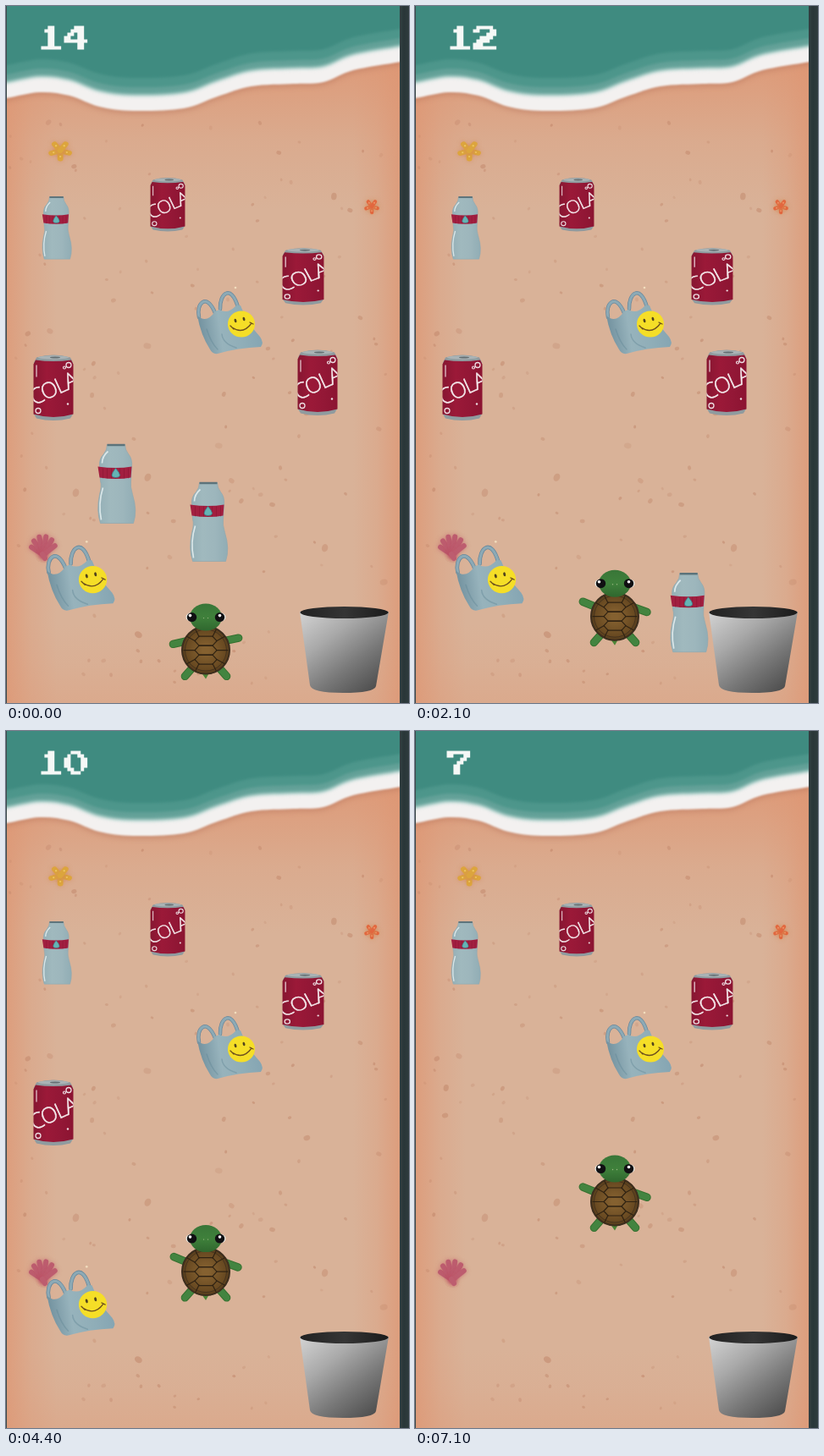
An HTML page with a canvas for the animation above (7.2 s loop, 476 px wide and 824 px high).

```html
<!DOCTYPE html>
<html lang="en">
<head>
<meta charset="utf-8">
<title>Beach clean-up</title>
<style>
html, body { margin: 0; width: 100%; height: 100%; overflow: hidden; background: #2b393b; }
canvas { display: block; }
</style>
</head>
<body>
<canvas id="stage" width="476" height="824"></canvas>
<script>
const W = 476, H = 824, LOOP = 7200, TAU = Math.PI * 2;
const stage = document.getElementById('stage').getContext('2d');
const backdrop = document.createElement('canvas');
backdrop.width = W;
backdrop.height = H;
let g = backdrop.getContext('2d');

const clamp = v => Math.min(1, Math.max(0, v));
const mix = (a, b, p) => a + (b - a) * p;
const easeOut = (p, power) => 1 - (1 - p) ** power;

function oval(x, y, rx, ry, fill, angle = 0) {
  g.beginPath();
  g.ellipse(x, y, rx, ry, angle, 0, TAU);
  if (fill) { g.fillStyle = fill; g.fill(); }
}

function ring(x, y, r, color, width) {
  oval(x, y, r, r);
  g.strokeStyle = color;
  g.lineWidth = width;
  g.stroke();
}

function shape(path, fill, stroke, width = 1) {
  const p = new Path2D(path);
  if (fill) { g.fillStyle = fill; g.fill(p, 'evenodd'); }
  if (stroke) { g.strokeStyle = stroke; g.lineWidth = width; g.stroke(p); }
}

const line = (x0, y0, x1, y1, color, width) => shape(`M${x0} ${y0}L${x1} ${y1}`, null, color, width);

function gradient(x0, y0, x1, y1, ...colors) {
  const grad = g.createLinearGradient(x0, y0, x1, y1);
  colors.forEach((c, i) => grad.addColorStop(i / (colors.length - 1), c));
  return grad;
}

function at(x, y, sx, sy, draw) {
  g.save();
  g.translate(x, y);
  g.scale(sx, sy);
  draw();
  g.restore();
}

function sand() {
  g.fillStyle = '#d9b298';
  g.fillRect(0, 0, W, H);
  const fade = (x0, y0, x1, y1, alpha) => {
    const tint = a => `rgba(222,150,115,${a * alpha})`;
    g.fillStyle = gradient(x0, y0, x1, y1, tint(1), tint(.35), tint(0));
    g.fillRect(0, 0, W, H);
  };
  fade(0, 0, 60, 0, .75);
  fade(466, 0, 410, 0, .75);
  fade(0, 80, 0, 240, .75);
  fade(0, H, 0, 730, .3);

  let seed = 29;
  const random = () => (seed = seed * 16807 % 2147483647) / 2147483647;
  for (let i = 0; i < 130; i++) {
    const r = 1.4 + random() ** 3 * 2.4;
    oval(random() * 460, 115 + random() * 705, r * 1.3, r, `rgba(190,130,102,${.2 + random() * .3})`, random() * 3);
  }
}

const shore = [[-35, 105], [0, 100], [40, 93], [75, 97], [110, 110], [150, 115], [210, 112], [250, 98],
  [290, 86], [340, 83], [375, 81], [410, 67], [466, 57], [500, 50]];

// Fills from above the stage down to the shoreline shifted by dy.
function water(dy, fill, blur) {
  g.filter = `blur(${blur}px)`;
  g.beginPath();
  g.moveTo(-35, -20);
  g.lineTo(-35, shore[0][1] + dy);
  for (let i = 0; i < shore.length - 1; i++) {
    const [before, a, b, after] = [-1, 0, 1, 2].map(k => shore[Math.min(shore.length - 1, Math.max(0, i + k))]);
    g.bezierCurveTo(a[0] + (b[0] - before[0]) / 6, a[1] + (b[1] - before[1]) / 6 + dy,
      b[0] - (after[0] - a[0]) / 6, b[1] - (after[1] - a[1]) / 6 + dy, b[0], b[1] + dy);
  }
  g.lineTo(500, -20);
  g.fillStyle = fill;
  g.fill();
  g.filter = 'none';
}

function sea() {
  water(12, 'rgba(180,112,88,.45)', 3);
  water(9, '#f3f1f0', 1.2);
  water(-8, '#dcebe8', 2);
  water(-10, '#63a198', 2);
  water(-19, '#4d968b', 1.5);
  water(-30, '#3f8b80', 1.5);
}

function star(x, y, r, color, dots) {
  g.lineCap = 'round';
  for (let i = 0; i < 5; i++) {
    const a = i * TAU / 5 + .3, dx = Math.cos(a) * r, dy = Math.sin(a) * r;
    line(x, y, x + dx, y + dy, color, r * .62);
    oval(x + dx * .75, y + dy * .75, 1, 1, dots);
  }
}

function decorations() {
  g.shadowBlur = 5;
  g.shadowColor = 'rgba(215,140,85,.7)';
  at(64, 171, 1.15, 1, () => star(0, 0, 9.5, '#dca53c', '#f0cc60'));
  star(432, 237, 7, '#e2663e', '#f39468');
  g.shadowColor = 'rgba(190,80,100,.6)';
  for (let i = 0; i < 6; i++) {
    const a = i * .57 - 3.05;
    line(44, 649, 44 + Math.cos(a) * 14, 641 + Math.sin(a) * 14, '#bd5d6f', 6);
  }
  line(43, 648, 46, 653, '#bd5d6f', 6);
  g.shadowBlur = 0;
}

function paintBackdrop() {
  sand();
  sea();
  decorations();
  g.fillStyle = gradient(464, 0, 476, 0, '#354244', '#293638', '#2f3c3e');
  g.fillRect(465, 0, 11, H);
  g.fillStyle = '#3b4a4b';
  g.fillRect(0, 0, 1, H);
}

// Trash is drawn around its own centre.
function can() {
  shape('M-20-36Q0-42 20-36L23-30V31L20 36Q0 41-20 36L-23 31V-30Z', '#8f9b9f');
  g.save();
  const body = new Path2D('M-21-33Q0-30 21-33L23.5-28V31Q0 38-23.5 31V-28Z');
  g.fillStyle = gradient(-24, 0, 24, 0, '#861631', '#9b1938', '#931736', '#8b1431');
  g.fill(body);
  g.clip(body);
  g.save();
  g.translate(-23, 21);
  g.rotate(-.43);
  g.fillStyle = g.strokeStyle = '#f6edef';
  g.lineWidth = .5;
  g.font = '300 26px "Open Sans", sans-serif';
  g.letterSpacing = '-1.5px';
  g.fillText('COLA', 0, 0);
  g.strokeText('COLA', 0, 0);
  g.restore();
  for (const s of [-1, 1]) {
    ring(s * 18, s * -27, 3, '#eddce1', 1.3);
    ring(s * 13, s * -30 + 6, 1.5, '#eddce1', 1.2);
  }
  oval(17, 19, 1.2, 1.2, '#eddce1');
  line(-20, -27, -20, -13, '#e4c3cb', 1.3);
  g.restore();
  oval(0, -36, 18, 2.2, '#aab3b5');
  oval(2, -36, 6, 1.1, '#646f73');
}

function bottle() {
  shape('M-11-46H10Q10-40 14-35Q19-29 18-20L17-3Q16 3 19 13Q25 32 20 47H-19Q-24 32-20 13Q-17 3-19-3L-20-20Q-21-29-15-35Q-11-40-11-46Z',
    gradient(-22, 0, 22, 0, '#94afb6', '#a0b9be', '#9db6bc', '#91adb5'), '#8da8b0', .7);
  line(-11, -45.5, 10, -45.5, '#5c737a', 2.5);
  shape('M-22-20Q0-17 18-20L17-7Q0-4-20-7Z', '#a21f40');
  for (let x = -16; x < 16; x += 5) line(x, -18, x, -6, 'rgba(120,15,45,.35)', 1);
  shape('M-1-18Q9-7-1-7Q-10-7-1-18Z', '#65b4b5', '#397d88', .8);
  shape('M-10-38Q-17-32-17-24M-16 5Q-22 24-18 43', null, '#dae7e9', 1.7);
}

function bag() {
  g.lineCap = 'round';
  for (const [color, width] of [['#68879b', 4.5], ['#8caab6', 3]])
    shape('M-36-6C-40-22-27-36-17-11M-11-16C-12-34 2-46 10-18', null, color, width);
  shape('M-38-8Q-27 2-17-13L-12-15Q-2-9 8-20L13-20Q20 0 36 17Q41 24 37 29Q10 30-14 37Q-20 38-23 32Q-34 15-38-8Z',
    gradient(-34, 10, 34, 0, '#7594a1', '#97b3bc', '#90aeb8', '#86a6b3'));
  shape('M-27 8Q-22 24-14 32M-9 14Q-8 25 8 30', null, 'rgba(96,132,148,.4)', 1.5);
  oval(14, 2, 16, 15.5, '#f5de27');
  for (const s of [-1, 1]) oval(12 + s * 5, -3 - s, 1.4, 2.4, '#51431c', -.25);
  shape('M3 6Q16 15 26 1M1 4L5 8M24 0L28 2', null, '#6d501e', 1.3);
  oval(7, -41, 1.3, 1.3, '#f1dcbd');
}

const binMouth = { x: 400, y: 740 };
const trash = [
  { draw: can, x: 191, y: 235, sx: .87, sy: .82 },
  { draw: can, x: 351, y: 320, sx: 1.04, sy: .87 },
  { draw: bottle, x: 60, y: 262, sx: .78, sy: .79 },
  { draw: bag, x: 264, y: 374 },
  { draw: bottle, x: 239.5, y: 609.5, from: 400, to: 1300 },
  { draw: bottle, x: 130.5, y: 564.5, from: 1750, to: 2500 },
  { draw: can, x: 368, y: 445.5, from: 3150, to: 3850 },
  { draw: bag, x: 88, y: 676, sx: 1.04, sy: 1.04, from: 4700, to: 6100 },
  { draw: can, x: 56, y: 451.5, from: 6330, to: 6700, sag: 170 }
];

// A dragged item slows down along a sagging path, then drops out of sight.
function drawTrash({ draw, x, y, sx = 1, sy = 1, from = LOOP, to = LOOP + 1, sag = 34 }, t) {
  if (t >= to) return;
  const p = easeOut(clamp((t - from) / (to - from)), 2);
  at(mix(x, binMouth.x, p), mix(y, binMouth.y, p) + sag * Math.sin(p * Math.PI), sx, sy, draw);
}

function bin() {
  shape('M347 716L359 803Q361 812 398 812Q435 812 437 804L452 716Z',
    gradient(355, 715, 430, 815, '#d0d0d0', '#a9a9a9', '#787878', '#4c4c4c'));
  oval(399.5, 717, 52, 7, gradient(348, 0, 452, 0, '#222', '#353535', '#1b1b1b'));
}

// The turtle takes one stride up the beach for each binned item.
const STRIDE = 400, STEP = 41.3;
const strideStarts = [-.65 * STRIDE, ...trash.filter(item => item.to).map(item => item.to)];

function turtlePose(t) {
  let y = 763 + STEP, swing = 1;
  for (const start of strideStarts) {
    const p = clamp((t - start) / STRIDE);
    y -= STEP * easeOut(p, 3);
    if (p > 0 && p < 1) swing = Math.cos(p * TAU);
  }
  return { y: y - 2 * (1 - swing), swing };
}

function limb(x, y, angle, length) {
  const endX = x + Math.cos(angle) * length, endY = y + Math.sin(angle) * length;
  line(x, y, endX, endY, '#35702f', 9.5);
  line(x, y, endX, endY, '#438440', 7.5);
}

function turtle(t) {
  const { y, swing } = turtlePose(t);
  g.save();
  g.translate(236, y);
  g.lineCap = g.lineJoin = 'round';
  for (const s of [-1, 1]) {
    const forward = s > 0 ? 0 : Math.PI;
    limb(s * 22, -11, forward + (.37 - s * .02) * swing, 17);
    limb(s * 16, 21, forward + s * .85, 13);
  }
  shape('M-5 27L0 34L4 27Z', '#4c8537');
  const shell = g.createRadialGradient(0, 0, 4, 0, 0, 30);
  shell.addColorStop(0, '#856130');
  shell.addColorStop(.75, '#684921');
  shell.addColorStop(1, '#493318');
  oval(0, 0, 28.5, 28.5, shell);
  ring(0, 0, 28, '#3d2e1e', 2);
  ring(0, 0, 24.5, '#3d2e1e', .8);
  for (const cy of [-11, 0, 11])
    shape(`M-13 ${cy}L-8 ${cy - 5.5}H8L13 ${cy}L8 ${cy + 5.5}H-8Z`, null, '#302313', 1.2);
  for (const sx of [-1, 1]) {
    line(sx * 13, 0, sx * 26, 0, '#302313', 1.2);
    for (const sy of [-1, 1])
      shape(`M${sx * 13} ${sy * 11}L${sx * 22} ${sy * 16}M${sx * 8} ${sy * 16}L${sx * 12} ${sy * 24}`, null, '#302313', 1.2);
  }
  oval(0, -39, 19, 16, gradient(0, -55, 0, -23, '#397638', '#3f803b', '#2f672e'));
  for (const s of [-1, 1]) {
    oval(s * 18, -39, 5.5, 5, '#e8eae4');
    oval(s * 16.5, -39, 5.7, 5.5, '#100f12');
    oval(s * 17.5 - 1, -41, 1.8, 1.8, '#fff');
    oval(s * 2.5, -38, .7, .7, '#9cb982');
  }
  g.restore();
}

// Blocky digit outlines on a grid of seven rows.
const digits = {
  0: 'M2 0H5V1H6V2H7V5H6V6H5V7H2V6H1V5H0V2H1V1H2ZM2 1H4V2H5V6H3V5H2Z',
  1: 'M3 0H5V6H7V7H1V6H3V2H2V1H3Z',
  2: 'M1 0H6V1H7V3H6V4H5V5H3V6H7V7H0V5H1V4H2V3H4V2H5V1H2V2H0V1H1Z',
  3: 'M1 0H7V1H6V2H5V3H6V4H7V6H6V7H1V6H0V5H2V6H5V4H2V3H3V2H4V1H1Z',
  4: 'M3 0H6V4H7V5H6V7H4V5H0V3H1V2H2V1H3ZM4 2V4H2V3H3V2Z',
  7: 'M0 0H7V2H6V3H5V4H4V7H2V4H3V3H4V2H5V1H2V2H0Z',
  8: 'M1 0H5V1H6V3H5V4H7V6H6V7H1V6H0V4H1V3H0V1H1ZM2 1H5V3H3V2H2ZM1 4H3V5H5V6H1Z',
  9: 'M1 0H6V1H7V5H6V6H5V7H1V6H4V5H5V4H1V3H0V1H1ZM2 1H5V3H2Z'
};

function score(value) {
  [...String(value)].forEach((digit, place) =>
    at(37.5 + place * 31, 23.5, 3.95, 4, () => shape(digits[digit], '#f5f8f6')));
}

function render(t) {
  g.drawImage(backdrop, 0, 0);
  bin();
  turtle(t);
  trash.forEach(item => drawTrash(item, t));
  score(14 - Math.floor((t + 300) / 1000));
}

paintBackdrop();
g = stage;
const start = performance.now();
function tick() {
  render((performance.now() - start) % LOOP);
  requestAnimationFrame(tick);
}
tick();
</script>
</body>
</html>
```
